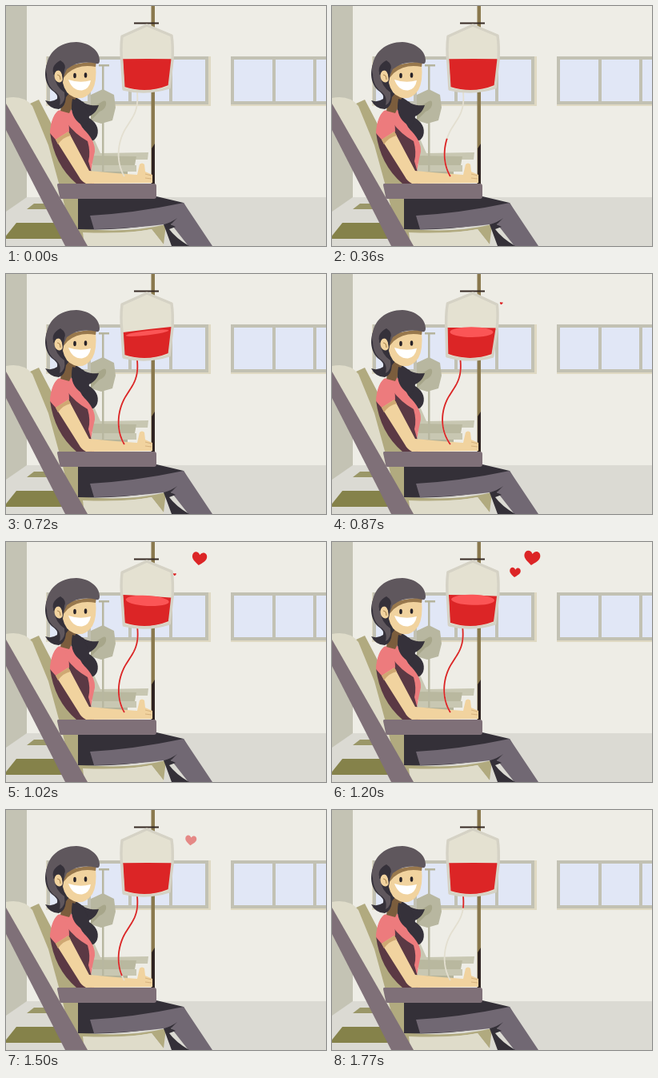
An HTML page with a canvas for the animation above (1800 ms loop, 400x300 px).

```html
<!DOCTYPE html>
<html lang="en">
<head>
<meta charset="utf-8">
<title>Blood donation</title>
<style>
html, body { margin: 0; width: 100%; height: 100%; overflow: hidden; background: #eeede6; }
canvas { display: block; width: 100vw; height: 100vh; }
</style>
</head>
<body>
<canvas id="stage" width="400" height="300"></canvas>
<script>
const ctx = document.getElementById('stage').getContext('2d');
const LOOP = 1800, STEP = 30;
const RED = '#dc2526', SKIN = '#f1d39f', HAIR = '#35313a', HAIR_LIT = '#5f575d';
const PINK = '#ed7b7d', MAROON = '#5b3944', CREAM = '#dfdcca', OLIVE = '#b1aa7f';
const MAUVE = '#7f7078', DARK = '#343038', SHADE = '#7b5d3d';

const clamp = v => Math.max(0, Math.min(1, v));
const ramp = (t, a, b) => clamp((t - a) / (b - a));
const smooth = (t, a, b) => { const p = ramp(t, a, b); return p * p * (3 - 2 * p); };
const easeOut = (p, n) => 1 - (1 - p) ** n;

function shape(d, color) {
  ctx.fillStyle = color;
  ctx.fill(new Path2D(d));
}
function line(d, color, width) {
  ctx.strokeStyle = color;
  ctx.lineWidth = width;
  ctx.stroke(new Path2D(d));
}
function box(x, y, w, h, color) {
  ctx.fillStyle = color;
  ctx.fillRect(x, y, w, h);
}
function oval(x, y, rx, ry, color, tilt = 0) {
  ctx.fillStyle = color;
  ctx.beginPath();
  ctx.ellipse(x, y, rx, ry, tilt, 0, 7);
  ctx.fill();
}

function room() {
  box(0, 0, 400, 300, '#eeede6');
  box(0, 239, 400, 61, '#dbdad3');
  shape('M0 0H26V239L0 257Z', '#c4c3b4');
  shape('M35 247H64L62 254H26Z', '#9a9768');
  shape('M13 271H78L90 291H-3Z', '#85824a');
  // windows
  box(50, 63, 206, 62, '#dfd9c3');
  box(51, 63, 202, 60, '#c2c1b3');
  for (const x of [55, 106, 157, 208]) box(x, 67, x > 200 ? 41 : 47, 52, '#e1e7f6');
  box(281, 63, 119, 62, '#dfd9c3');
  box(281, 63, 119, 60, '#c2c1b3');
  for (const x of [285, 337, 388]) box(x, 67, x < 300 ? 48 : 47, 52, '#e1e7f6');
  // far seat and drip stand
  shape('M106 157L118 184L178 183L177 192H120L108 186Z', '#c8c7b2');
  shape('M106 187L163 188L161 199H108Z', '#b9b89f');
  shape('M106 199H163V207H152V214H106Z', '#c8c7b2');
  shape('M106 207H152V214H106Z', '#b5b49b');
  box(120, 73, 2.5, 135, '#b8b7a0');
  box(116, 73, 13, 2.5, '#b5b49d');
  shape('M121 104L135 111L137 127L133 143L119 147L106 143V111Z', '#b8b7a0');
  shape('M121 119Q126 117 125 124Q123 130 117 132L106 143V128Z', '#a7a68a');
  // stand
  box(181.5, 0, 4.5, 240, '#8a794e');
  shape('M182 178L186 172V222H182Z', '#2f2421');
  box(160, 20.5, 31, 2, '#372a24');
}

function chair() {
  shape('M30 122L41 117L66 165L92 222V278Q150 285 200 273L197 298L182 279Q150 285 98 284L104 300H90Z', OLIVE);
  shape('M96 283Q150 285 182 279L197 298V300H98Z', CREAM);
  shape('M0 115Q22 111 33 125L53 174L70 236L76 262L0 135Z', CREAM);
  shape('M0 122L102 300H74L0 155Z', MAUVE);
}

function legs() {
  shape('M90 238H188L222 246L230 260L180 274Q140 281 90 279Z', DARK);
  shape('M105 262Q160 259 222 246L258 300H228L206 272Q160 278 110 279Z', '#716873');
  shape('M197 273Q208 270 214 265L206 273L212 276L204 279Q212 290 229 300H207L200 281Z', DARK);
}

function torso() {
  // ponytail
  shape('M83 113C95 115 95 126 116 124C113 133 108 136 102 139C112 144 117 153 114 162C111 170 102 172 92 167C100 164 101 157 94 151C80 143 80 126 83 113Z', HAIR);
  shape('M66 131Q57 136 55 157L76 204L91 223H110Q111 213 106 207Q108 194 111 182Q112 168 96 153L83 130Z', PINK);
  shape('M55 158L62 166L76 159L75 145Q86 160 102 169Q106 183 103 194L107 208V222H88Q60 198 55 158Z', MAROON);
  shape('M67 130Q58 134 55 159L62 167L79 157Q80 142 67 130Z', PINK);
  shape('M72 106L88 112L84 124L79 134L68 131Z', SHADE);
  shape('M83 116Q79 136 91 146L99 152L104 139L97 120Z', HAIR);
  shape('M62 167L78 157L104 206Q135 209 164 211L167 198Q170 195 173 198L174 207L183 211V221L100 222Q94 219 91 213Z', SKIN);
  shape('M62 167L78 157L81 162Q71 164 65 173Z', '#cfa873');
  line('M174 210L182 212M174 215L182 216', '#d6b27e', 1);
}

function head() {
  shape('M60 58C46 73 46 94 57 105Q66 111 64 116Q57 121 49 118Q55 129 66 129Q74 127 75 114L86 100L83 66Z', HAIR);
  shape('M51 80Q50 98 60 106Q70 112 67 124Q75 120 73 108Q62 101 60 86Z', HAIR_LIT);
  shape('M70 75L112 73Q114 94 108 105Q98 119 85 114Q74 110 71 96Z', SKIN);
  oval(66, 88, 5.5, 7.5, SKIN, -.15);
  line('M64 86Q68 86 68 92', '#a8834f', 1.2);
  shape('M72 77Q95 69 113 70L112 76Q91 72 77 84L71 91Z', '#98784d');
  shape('M50 80C51 57 68 45 88 45C105 46 117 56 117 68Q117 73 113 72Q91 67 76 79Q72 86 71 94Q71 82 66 80Q60 80 58 88Q50 88 50 80Z', HAIR_LIT);
  shape('M68 68Q76 73 73 80L71 96Q71 82 66 80Q61 80 60 86Q55 75 68 68Z', HAIR);
  oval(86, 87, 1.8, 3.2, '#282329');
  oval(99.5, 86.5, 1.8, 3.2, '#282329');
  shape('M78 92Q92 97 106 93Q104 104 95 105.500Q83 106 78 92Z', '#fff');
}

function armrest() {
  shape('M65 222H185Q188 222 188 225V238Q188 241 185 241H69Q67 241 67 238L64 224Q64 222 65 222Z', MAUVE);
}

const bez = (u, a, b, c, d) =>
  (1 - u) ** 3 * a + 3 * u * (1 - u) ** 2 * b + 3 * u * u * (1 - u) * c + u ** 3 * d;

// Point on the tube: 0 at the bag, 1 at the wrist
function tubeAt(s, dx) {
  if (s < .4) {
    const u = s / .4;
    return [bez(u, 164 + dx, 166 + dx, 159 + dx, 151.5 + dx), bez(u, 108, 130, 138, 150)];
  }
  const u = (s - .4) / .6;
  return [bez(u, 151.5 + dx, 138.5 + dx, 137 + dx * .7, 148), bez(u, 150, 169, 195, 213)];
}
function tubePart(from, to, dx, color, width) {
  if (to <= from) return;
  ctx.strokeStyle = color;
  ctx.lineWidth = width;
  ctx.beginPath();
  for (let i = 0; i <= 50; i++) ctx.lineTo(...tubeAt(from + (to - from) * i / 50, dx));
  ctx.stroke();
}
function tube(t, dx) {
  const fill = ramp(t, 90, 570) ** 1.4;
  const drain = ramp(t, 1470, 1800) ** 1.15;
  tubePart(0, 1, dx, '#e3dfd0', 1.8);
  tubePart(1 - fill, 1 - drain, dx, RED, 1.8);
}

function heart(t, start, x, y, size, fade) {
  const p = ramp(t, start, start + 300);
  const alpha = 1 - ramp(t, fade, fade + 140);
  if (!p || !alpha) return;
  const k = size * easeOut(p, 3) / 20;
  ctx.save();
  ctx.globalAlpha = alpha;
  ctx.translate(206 + (x - 206) * easeOut(p, 2), 42 + (y - 42) * easeOut(p, 4));
  ctx.rotate(.12);
  ctx.scale(k, k);
  shape('M0 9C-5 5 -10 2 -10 -3C-10 -9 -3 -11 0 -5C3 -11 10 -9 10 -3C10 2 5 5 0 9Z', RED);
  ctx.restore();
}

function bag(t, dx) {
  const open = smooth(t, 570, 900) * (1 - smooth(t, 1200, 1470));
  // the surface rocks and settles
  const tilt = t < 570 ? 0 : -.145 * (1 - ramp(t, 570, 1470)) * Math.sin(2 * Math.PI * (t - 570) / 680);
  const level = 66.3 + 26 * Math.abs(tilt), rise = 31 * tilt;
  ctx.save();
  ctx.translate(176, 22);
  ctx.rotate(-dx / 86);
  ctx.translate(-176, -22);
  const body = 'M176 24L207 37Q209 50 208 68L204 102Q176 111 147 104L145 72Q143 54 145 38Z';
  shape(body, '#e4e1d1');
  ctx.save();
  ctx.clip(new Path2D(body));
  shape(`M146 ${level - rise}Q176 ${level - .5} 209 ${level + rise}L203 99Q176 110 148 101Z`, RED);
  if (open > .01) oval(176.5, level + 3.5 + 2 * open, 27, 6.5 * open, '#fb5556', tilt);
  ctx.restore();
  line(body, '#d5d2c5', 3.4);
  ctx.restore();
}

// Sideways drift of the bag's lower end
function sway(t) {
  const env = smooth(t, 690, 780) * (1 - smooth(t, 1380, 1500));
  return -2.5 * env * (.4 + Math.sin(2 * Math.PI * (t - 750) / 460));
}

function draw(t) {
  const dx = sway(t);
  ctx.lineJoin = 'round';
  room();
  chair();
  legs();
  torso();
  head();
  armrest();
  tube(t, dx);
  heart(t, 850, 250, 20, 20, 1290);
  heart(t, 990, 231, 38, 14, 1430);
  bag(t, dx);
}

const began = performance.now();
function tick() {
  const t = (performance.now() - began) % LOOP;
  draw(Math.floor(t / STEP) * STEP);
  requestAnimationFrame(tick);
}
tick();
</script>
</body>
</html>
```
